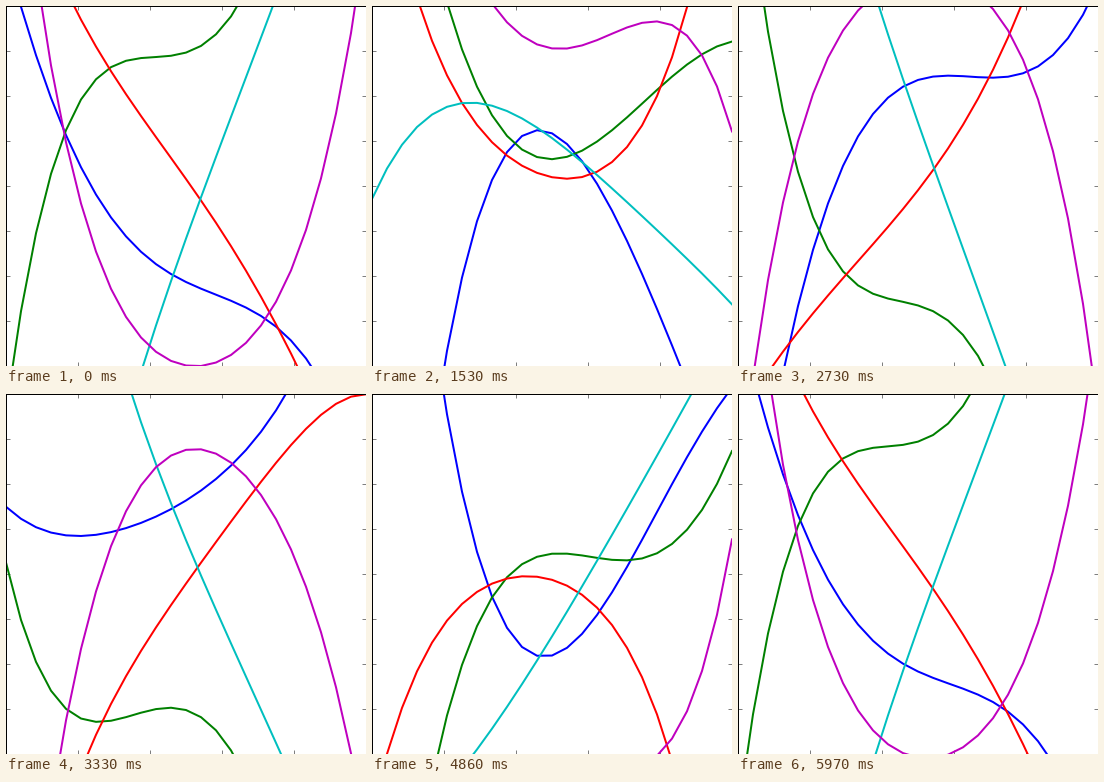
Animation, 360 px wide and 360 px high, one loop 6 s. Source, as a matplotlib script:

```python
import numpy as np
import matplotlib.pyplot as plt
from matplotlib.animation import FuncAnimation

SIZE, DPI = 360, 72
FRAMES, INTERVAL = 200, 30
HALF = SIZE / 2

# Each curve is a complex quartic, lowest power first. It makes one full turn
# in the complex plane per loop, and its real part is drawn.
QUARTICS = {
    "b": [-96 + 49.7j, -86.6 - 88.3j, 93.9 - 545.4j, -182 + 351.4j, -33 - 88.3j],
    "g": [133.4 + 31j, 56 + 4.7j, 253 + 334.4j, 436 - 215.5j, -119 + 13.8j],
    "r": [7 + 9j, -254.5 - 43.6j, -35.3 + 204j, -93 + 49.3j, 38 + 189j],
    "c": [-52.6 + 46.3j, 502 - 117.3j, -91.4 - 79.7j, 136 + 84.6j, -69 - 39j],
    "m": [-179.5 + 132j, -30 - 24.3j, 293 + 293.8j, -80.5 - 200j, 249 - 139j],
}

x = np.linspace(-1, 1, 25)

fig = plt.figure(figsize=(SIZE / DPI, SIZE / DPI), dpi=DPI, facecolor="white")
ax = fig.add_axes([0, 0, 1, 1])
ax.set_xlim(-1, 1)
ax.set_ylim(-HALF, HALF)
ax.set_xticks(np.linspace(-1, 1, 6))
ax.set_yticks(np.linspace(-HALF, HALF, 9))
ax.tick_params(direction="in", length=4, width=0.5, top=True, right=True,
               labelbottom=False, labelleft=False)
for spine in ax.spines.values():
    spine.set_linewidth(1)

waves = [np.polynomial.polynomial.polyval(x, q) for q in QUARTICS.values()]
lines = [ax.plot(x, w.real, color=c, lw=2)[0] for c, w in zip(QUARTICS, waves)]


def update(i):
    turn = np.exp(-2j * np.pi * i / FRAMES)
    for line, wave in zip(lines, waves):
        line.set_ydata((wave * turn).real)
    return lines


anim = FuncAnimation(fig, update, frames=FRAMES, interval=INTERVAL,
                     repeat=True, repeat_delay=0)
plt.show()
```
